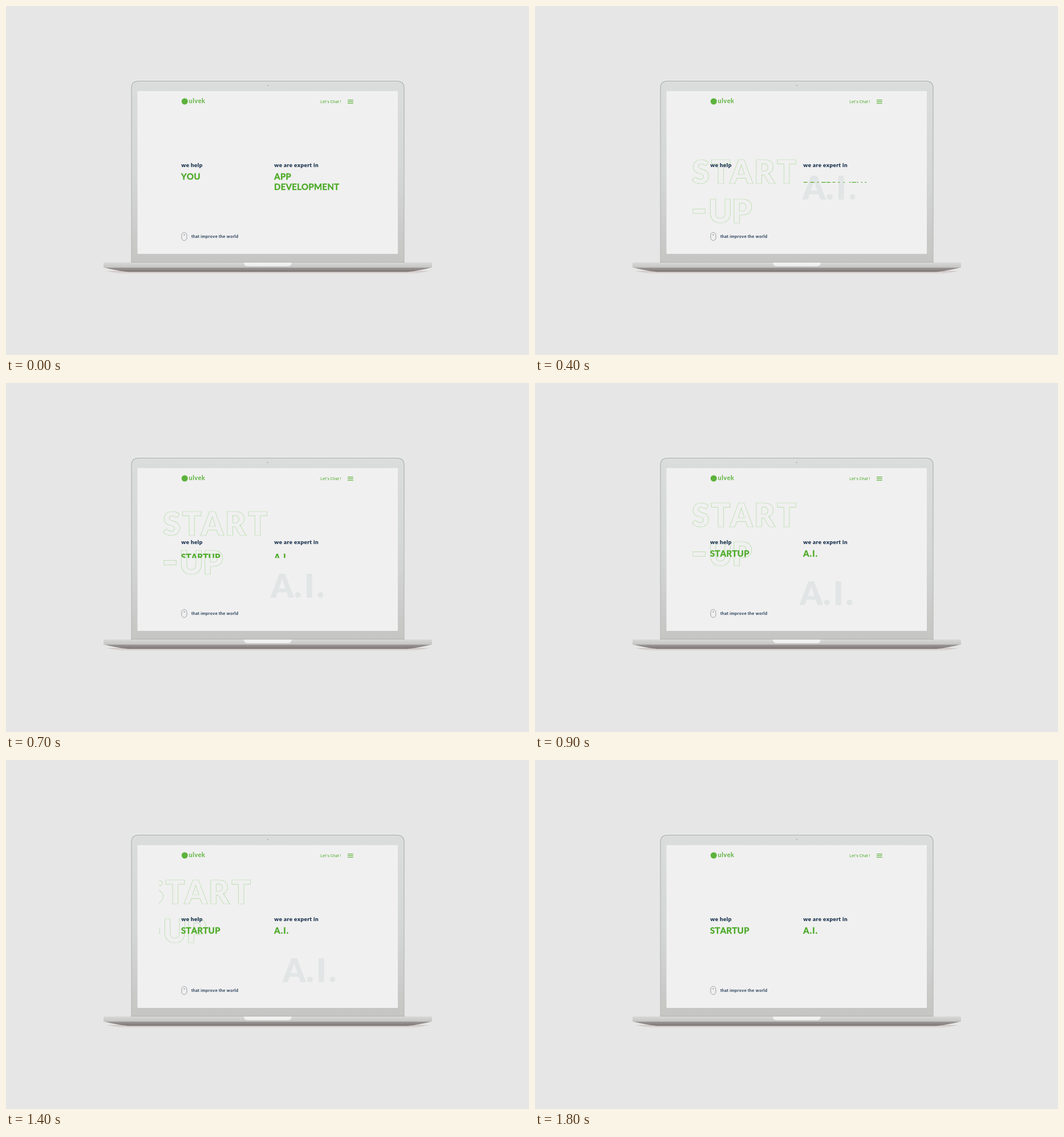
An HTML page that plays this animation: 917 px wide and 611 px high, repeating every 2500 ms.

```html
<!DOCTYPE html>
<html lang="en">
<head>
<meta charset="utf-8">
<title>Laptop landing page</title>
<style>
html, body { margin: 0; width: 100%; height: 100%; overflow: hidden; background: #e6e6e6; }
svg { display: block; width: 100vw; height: 100vh; }
text { font-kerning: none; }
.lato { font-family: Lato, sans-serif; font-weight: 900; }
.inter { font-family: Inter, sans-serif; }
.lead { font-size: 10px; letter-spacing: .3px; fill: #1b3350; }
.word { font: 700 15px Lato, sans-serif; letter-spacing: .3px; fill: #4caa27; stroke: #4caa27; stroke-width: .4; }
.outline { font-size: 56px; fill: none; stroke: #acd99d; stroke-width: .7; }
.ghost { font-size: 57px; fill: #e2e5e5; }
</style>
</head>
<body>
<svg viewBox="0 0 917 611" preserveAspectRatio="none">
  <defs>
    <linearGradient id="lid" x1="0" y1="0" x2="0" y2="1">
      <stop offset="0" stop-color="#dbdddc"/>
      <stop offset=".5" stop-color="#d5d7d7"/>
      <stop offset="1" stop-color="#c5c5c3"/>
    </linearGradient>
    <linearGradient id="edge" x1="0" y1="0" x2="0" y2="1">
      <stop offset="0" stop-color="#adb2b1"/>
      <stop offset="1" stop-color="#b9bab9"/>
    </linearGradient>
    <linearGradient id="deck" x1="0" y1="0" x2="0" y2="1">
      <stop offset="0" stop-color="#d8d8d7"/>
      <stop offset="1" stop-color="#c4c4c3"/>
    </linearGradient>
    <linearGradient id="under" x1="0" y1="0" x2="0" y2="1">
      <stop offset="0" stop-color="#a09d9c"/>
      <stop offset="1" stop-color="#7c7473"/>
    </linearGradient>
    <linearGradient id="shade" x1="0" y1="0" x2="0" y2="1">
      <stop offset="0" stop-color="#cdc2c0"/>
      <stop offset="1" stop-color="#e6e6e6"/>
    </linearGradient>
    <clipPath id="leftBox"><rect x="268" y="149" width="260" height="285"/></clipPath>
    <clipPath id="rightBox"><rect x="440" y="149" width="166" height="285"/></clipPath>
    <clipPath id="row1"><rect x="300" y="292" width="320" height="14.3"/></clipPath>
    <clipPath id="row2"><rect x="300" y="308" width="320" height="16"/></clipPath>
  </defs>

  <rect width="917" height="611" fill="#e6e6e6"/>

  <path d="M176 464H742L712 469.500H206Z" fill="url(#shade)"/>
  <path d="M219 450V143Q219 129.500 232.500 129.500H685.500Q699 129.500 699 143V450Z" fill="#f0f1f1"/>
  <path d="M220 450V143.500Q220 131.300 232.500 131.300H685.500Q698 131.300 698 143.500V450Z"
        fill="url(#lid)" stroke="url(#edge)" stroke-width="1.300"/>
  <circle cx="458.800" cy="139.200" r="1" fill="#a5a8a8"/>
  <rect x="230.500" y="149" width="456.500" height="285" fill="#f0f0f0"/>

  <path d="M171 457.500H747Q730 462.500 704 465.500H214Q188 462.500 171 457.500Z" fill="url(#under)"/>
  <path d="M171 450.500Q171 449 172.500 449H745.500Q747 449 747 450.500V458H171Z" fill="url(#deck)"/>
  <path d="M219 448.500H699" stroke="#b2b2b0"/>
  <path d="M417 449H501Q500.500 455.500 495 455.500H423Q417.500 455.500 417 449Z" fill="#f0f0f0"/>

  <g clip-path="url(#leftBox)">
    <g id="big" class="lato outline">
      <text x="275 308.800 341.700 384 424.300" y="251.500">START</text>
      <rect x="277" y="295.500" width="21.500" height="7.800"/>
      <text x="304 345" y="320.200">UP</text>
    </g>
  </g>
  <g clip-path="url(#rightBox)">
    <text id="ghost" class="lato ghost" x="464 505 523 544.800" y="388.500">A.I.</text>
  </g>

  <g fill="#5cb23b">
    <circle cx="313.300" cy="167" r="5.500"/>
    <text class="lato" x="320.500" y="170.300" style="font-size:11px;font-weight:700;letter-spacing:.5px">ulvek</text>
    <text class="inter" x="551.300" y="169.500" style="font-size:6.700px;font-weight:500">Let's Chat !</text>
    <path d="M599 164.700H608.800M599 167.600H608.800M599 170.500H608.800" stroke="#5cb23b" stroke-width="1.200"/>
  </g>

  <text class="lato lead" x="307.300" y="282.300">we help</text>
  <text class="lato lead" x="470.300" y="282.300">we are expert in</text>

  <g clip-path="url(#row1)">
    <g class="out word">
      <text x="307" y="304.200">YOU</text>
      <text x="470.300" y="304.200">APP</text>
    </g>
    <g class="in word">
      <text x="307" y="304.200">STARTUP</text>
      <text x="470.300" y="304.200" style="letter-spacing:1px">A.I.</text>
    </g>
  </g>
  <g clip-path="url(#row2)">
    <text class="out word" x="470" y="322">DEVELOPMENT</text>
  </g>

  <rect x="308" y="396.500" width="9" height="14" rx="4.500" fill="none" stroke="#9a9fa2"/>
  <circle cx="312.500" cy="400.700" r=".9" fill="#6d747a"/>
  <text class="inter" x="325" y="406.300" fill="#1b3350" style="font-size:7px;font-weight:600;letter-spacing:.27px">that improve the world</text>
</svg>
<script>
const LOOP = 2500, STEP = 100;
const big = document.getElementById('big');
const ghost = document.getElementById('ghost');
const outs = document.querySelectorAll('.out');
const ins = document.querySelectorAll('.in');

const span = (t, a, b) => Math.min(1, Math.max(0, (t - a) / (b - a)));
const smooth = u => u * u * (3 - 2 * u);
const cubic = u => u < .5 ? 4 * u ** 3 : 1 - 4 * (1 - u) ** 3;

function place(el, x, y, show = 1) {
  el.setAttribute('transform', `translate(${x.toFixed(2)} ${y.toFixed(2)})`);
  el.setAttribute('opacity', show);
}

function draw(t) {
  // old words rise out of their rows, new ones rise in
  const up = -13.4 * smooth(span(t, 0, 400));
  const rise = 14 * (1 - smooth(span(t, 500, 850)));
  outs.forEach(el => place(el, 0, up, t < 500 ? 1 : 0));
  ins.forEach(el => place(el, 0, rise, t >= 500 ? 1 : 0));

  // large words drift in vertically, then leave sideways
  const gap = (1 - span(t, 200, 900)) ** 1.5;
  const leave = cubic(span(t, 1200, 1800));
  const show = t < 1800 ? span(t, 100, 400) : 0;
  place(big, -196 * leave, 99 * gap, show);
  place(ghost, 142 * leave + 5 * (1 - span(t, 400, 600)), -82 * gap, show);
}

const start = performance.now();
function tick() {
  const t = (performance.now() - start) % LOOP;
  draw(Math.floor(t / STEP) * STEP);
  requestAnimationFrame(tick);
}
draw(0);
requestAnimationFrame(tick);
</script>
</body>
</html>
```
